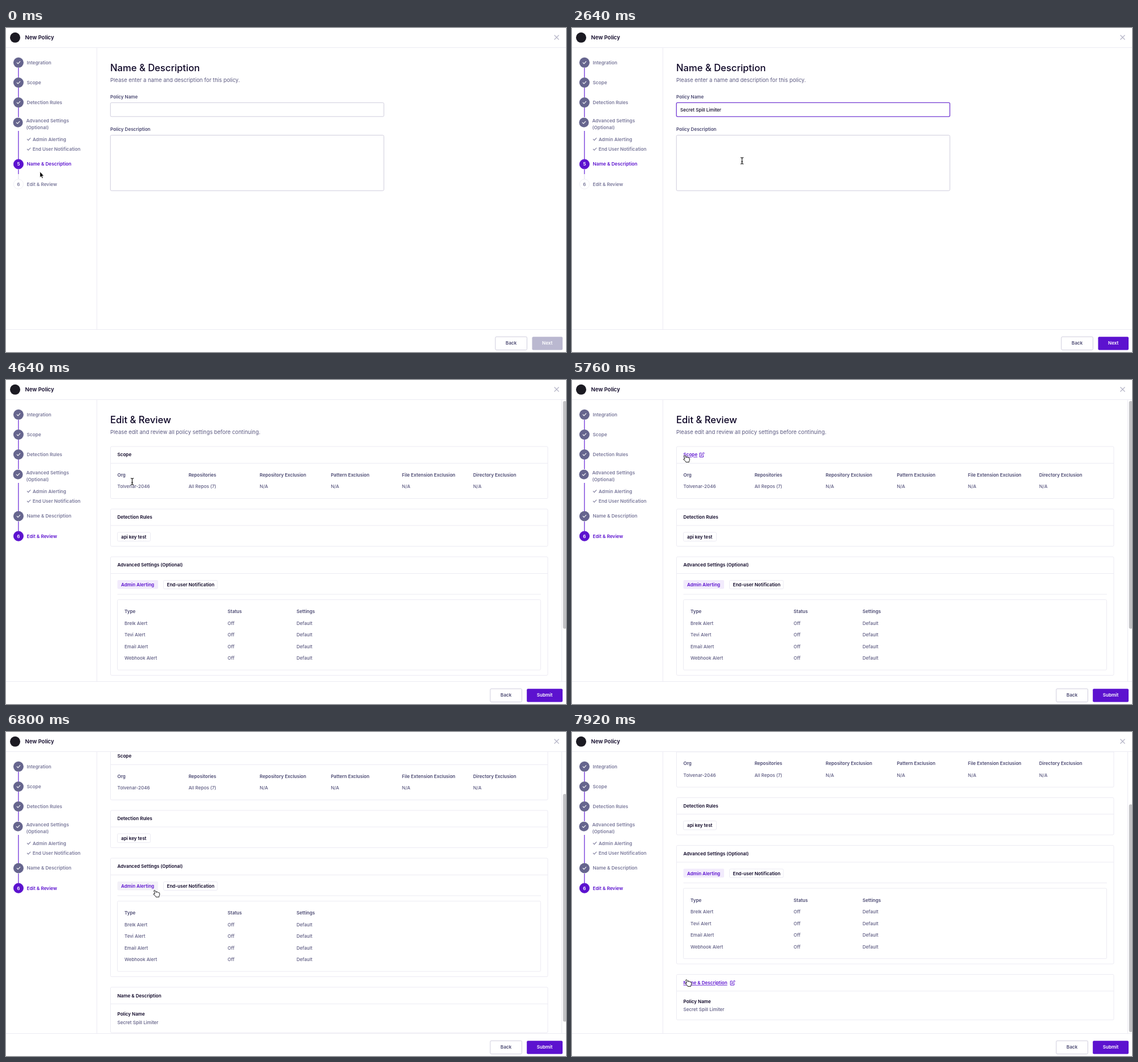
An HTML page for the animation above (8 s loop, 983x570 px).

```html
<!DOCTYPE html>
<html lang="en">
<head>
<meta charset="utf-8">
<title>New Policy</title>
<style>
  html, body { margin: 0; width: 100%; height: 100%; overflow: hidden; background: #fff; }
  svg { display: block; width: 983px; height: 570px; }
  text { font-family: Inter, "Open Sans", sans-serif; white-space: pre; }
  .hover text { fill: #5c12cf; text-decoration: underline; }
  .title .edit { display: none; }
  .hover .edit { display: inline; }
</style>
</head>
<body>
<svg id="stage" viewBox="0 0 983 570" xmlns="http://www.w3.org/2000/svg"></svg>
<script>
const PURPLE = '#5c12cf', INK = '#0d0526', LABEL = '#4b4972', BODY = '#5d5b82',
      MUTED = '#7a799b', DOT = '#66658e', LINE = '#ecebf3', EDGE = '#cfcddd';
const LOOP = 8000;
const POLICY = 'Secret Spill Limiter';

// ---- drawing helpers (text is placed by its vertical centre) ----
const text = (x, cy, str, fill = BODY, size = 8.07, weight = 500, anchor = 'start') =>
  `<text x="${x}" y="${cy + size * 0.36}" fill="${fill}" font-size="${size}" font-weight="${weight}" text-anchor="${anchor}">${str.replace(/&/g, '&amp;')}</text>`;
const bold = (x, cy, str, fill = LABEL) => text(x, cy, str, fill, 8.07, 600);
const step = (x, cy, str, fill = MUTED) => text(x, cy, str, fill, 8.2, 600);
const box = (x, y, w, h, fill = '#fff', stroke = LINE, extra = '') =>
  `<rect x="${x}" y="${y}" width="${w}" height="${h}" rx="2" fill="${fill}" stroke="${stroke}" ${extra}/>`;
const path = (d, stroke, width = 1, fill = 'none', extra = '') =>
  `<path d="${d}" fill="${fill}" stroke="${stroke}" stroke-width="${width}" ${extra}/>`;
const tick = (x, y, color) =>
  path(`M${x - 2.7} ${y + .1}l1.9 1.9 3.6-3.9`, color, 1.1, 'none', 'stroke-linecap="round" stroke-linejoin="round"');

function doneDot(x, y, r = 9) {
  return `<circle cx="${x}" cy="${y}" r="${r}" fill="${DOT}"/>` + tick(x, y, '#fff');
}

function numberDot(y, n, active) {
  const fill = active ? PURPLE : '#fff';
  return `<circle cx="21.9" cy="${y}" r="8.6" fill="${fill}" stroke="${active ? PURPLE : LINE}" stroke-width=".8"/>` +
    text(21.9, y, String(n), active ? '#fff' : MUTED, 8.2, 600, 'middle');
}

function sidebar(last) {
  const tail = last ? 266 : 257;
  let s = path(`M21.8 70V87M21.8 105V122M21.8 140V157M21.8 181V231M21.8 249V${tail}`, '#7c43dc', 1.4);
  if (!last) s += path('M21.8 257V266', '#e4e2ee', 1.2);
  [['Integration', 60.8], ['Scope', 96], ['Detection Rules', 131]].forEach(([label, y]) => {
    s += doneDot(21.9, y) + step(36.5, y, label);
  });
  s += doneDot(21, 166.2, 8.5) + step(35.5, 163.3, 'Advanced Settings') + step(35.5, 175, '(Optional)');
  [['Admin Alerting', 195.6], ['End User Notification', 213]].forEach(([label, y]) => {
    s += tick(40, y, MUTED) + step(46.7, y, label);
  });
  s += last ? doneDot(21.9, 239.5) : numberDot(239.5, 5, true);
  s += step(36.5, 239.5, 'Name & Description', last ? MUTED : PURPLE);
  return s + numberDot(274.6, 6, last) + step(36.5, 274.6, 'Edit & Review', last ? PURPLE : MUTED);
}

const heading = (title, sub) =>
  text(183, 69.6, title, INK, 16.6, 500) + text(183, 91.6, sub, BODY, 9.44, 400);

const button = (x, w, label, fill, stroke, color, id = '') =>
  box(x, 543.2, w, 23.2, fill, stroke, id) + text(x + w / 2, 554.5, label, color, 8.1, 600, 'middle');

// ---- first page: form ----
function formPage() {
  return sidebar(false) + heading('Name & Description', 'Please enter a name and description for this policy.') +
    bold(183, 121, 'Policy Name') + bold(183, 178, 'Policy Description') +
    box(183.3, 131.4, 480, 24.4, '#fff', EDGE, 'id="nameBox"') +
    box(183.3, 188.6, 480, 97.6, '#fff', EDGE, 'id="descBox"') +
    `<g id="value">${text(190, 143.8, POLICY, INK)}</g>` +
    `<rect id="caret" x="189.6" width="1" height="11" fill="${INK}"/>` +
    button(859, 55.5, 'Back', '#fff', EDGE, LABEL) +
    button(923.5, 53.5, 'Next', '#bab8d0', 'none', '#fff', 'id="next"');
}

// ---- second page: review ----
const TITLES = [
  { label: 'Scope', y: 131.5, end: 220 },
  { label: 'Detection Rules', y: 241.3, end: 258 },
  { label: 'Advanced Settings (Optional)', y: 325.5, end: 310 },
  { label: 'Name & Description', y: 552.7, end: 274 }
];
const TABS = [[195.5, 267], [276, 371.5]];

const card = (y, h, sep) => box(183.5, y, 767.5, h) + path(`M184 ${sep}H951`, LINE);

function titleRow({ label, y, end }) {
  const x = end + 3.5;
  const icon = path(`M${x + 4} ${y - 3}H${x + .6}V${y + 4}H${x + 7}V${y + .8}` +
    `M${x + 3} ${y + 1.6}l.3-1.8 4-4 1.4 1.4-4 4z`, PURPLE, 1, 'none', 'class="edit" stroke-linejoin="round"');
  return `<g class="title">${bold(195.5, y, label, INK)}${icon}</g>`;
}

function reviewContent() {
  let s = heading('Edit & Review', 'Please edit and review all policy settings before continuing.');
  s += card(117, 91.5, 146.5) + card(227, 65.5, 256) + card(311, 208.5, 340.5) + card(538, 80, 567.3);
  s += TITLES.map(titleRow).join('');
  const scope = [['Org', 'Tolvenar-2046'], ['Repositories', 'All Repos (7)'], ['Repository Exclusion'],
    ['Pattern Exclusion'], ['File Extension Exclusion'], ['Directory Exclusion']];
  scope.forEach(([head, value = 'N/A'], i) => {
    const x = 195.5 + i * 124.9;
    s += bold(x, 167, head) + text(x, 187.5, value);
  });
  s += box(195.5, 268, 58, 15.5) + bold(202, 276, 'api key test', INK);
  s += '<rect id="tab" x="195.5" y="352" width="71.5" height="15.5" rx="2"/>' + bold(202, 360.2, 'Admin Alerting', PURPLE);
  s += box(276.5, 352.5, 94.5, 15) + bold(282.5, 360.2, 'End-user Notification', INK);
  s += path('M195.5 377H939', LINE) + box(195.5, 386.5, 743, 123.7);
  const cols = [208, 389, 510];
  ['Type', 'Status', 'Settings'].forEach((head, i) => { s += bold(cols[i], 407.3, head); });
  ['Brelk', 'Tevi', 'Email', 'Webhook'].forEach((kind, row) => {
    [kind + ' Alert', 'Off', 'Default'].forEach((cell, i) => { s += text(cols[i], 427.9 + row * 20.5, cell); });
  });
  return s + bold(195.5, 585.3, 'Policy Name', INK) + text(195.5, 600, POLICY);
}

function reviewPage() {
  return sidebar(true) +
    `<g clip-path="url(#view)"><g id="scroller">${reviewContent()}</g></g>` +
    path('M975.5 35V530', LINE) +
    '<rect id="thumb" x="977.8" width="6" height="400.5" rx="2.8" fill="#c1c1c4"/>' +
    button(850, 55.5, 'Back', '#fff', EDGE, LABEL) +
    button(914.2, 62.8, 'Submit', PURPLE, 'none', '#fff');
}

const frame =
  '<circle cx="16" cy="16.8" r="9" fill="#1b1a22"/>' +
  text(33.5, 16.6, 'New Policy', INK, 9.5, 600) +
  path('M962.5 12.5l8 8m0-8l-8 8', '#b4b3c6', 1.2) +
  path('M0 34.5H983M0 530.5H983M159.5 35V530', LINE);

const cursors =
  '<circle id="glow" r="30" fill="#fffbe0" style="mix-blend-mode:multiply"/><g id="pointer">' +
  path('M-.4-.3V10L1.8 7.9 3.4 11.4 5 10.7 3.5 7.3H6.5Z', '#fff', .7, '#000') +
  path('M-2.6-5.6Q0-5.6 0-4Q0-5.6 2.6-5.6M0-4.5V4.5M-2.6 5.8Q0 5.8 0 4Q0 5.8 2.6 5.8M-1.4 1.8H1.4', '#222', 1.2) +
  path('M-.9.8Q.6-.6 1.6 1L3 4.2Q4-.2 5 3.8Q6.4 2.8 7 4.4Q9 3.6 9.2 6Q9.6 9 8.2 10.2V12H2.6L2 10.4-1.8 7.2Q-2.2 5.6.8 6.6Z', '#222', 1, '#fff', 'stroke-linejoin="round"') +
  '</g>';

const stage = document.getElementById('stage');
stage.innerHTML =
  '<defs><clipPath id="view"><rect x="160" y="35" width="815" height="495"/></clipPath></defs>' +
  '<rect width="983" height="570" fill="#fff"/>' + frame +
  `<g id="form">${formPage()}</g><g id="review">${reviewPage()}</g>` + cursors;

const el = {};
stage.querySelectorAll('[id]').forEach(node => { el[node.id] = node; });
const titles = [...stage.querySelectorAll('.title')];
const shapes = [...el.pointer.children];

// ---- timeline: [time, ...values] ----
const MOVES = [
  [20, 60, 253], [760, 320, 165], [1180, 212, 143.5], [2180, 212, 143.5], [2680, 300, 235],
  [3080, 300, 235], [3280, 337, 264], [3400, 337, 264], [3600, 921, 510.5], [3780, 947, 552],
  [4240, 947, 552], [4640, 221.5, 178.5], [5100, 205, 133], [5760, 197.3, 132.5], [6080, 225, 238],
  [6200, 225, 238], [6480, 260, 321], [6800, 260.5, 278.3], [7040, 262, 290], [7600, 203, 436], [7900, 200.5, 435.5]
];
const SCROLL = [[6440, 0], [6800, 89], [7040, 111.5]];
const CLICKS = [[1230, 1590], [2720, 3030], [3860, 4230]];
const NAME_FOCUS = 1230, PASTE = 2000, DESC_FOCUS = 2720, REVIEW = 4020, BLINK = 530;

function sample(keys, t) {
  if (t <= keys[0][0]) return keys[0].slice(1);
  const i = keys.findIndex(k => k[0] > t);
  if (i < 0) return keys[keys.length - 1].slice(1);
  const [a, b] = [keys[i - 1], keys[i]];
  const p = (t - a[0]) / (b[0] - a[0]), e = p * p * (3 - 2 * p);
  return a.slice(1).map((v, n) => v + (b[n + 1] - v) * e);
}

const show = (node, on) => node.setAttribute('display', on ? 'inline' : 'none');
const clamp = v => Math.max(0, Math.min(1, v));
const inside = (v, lo, hi) => v >= lo && v <= hi;

function focus(node, on) {
  node.setAttribute('stroke', on ? '#733bd3' : EDGE);
  node.setAttribute('stroke-width', on ? 1.3 : 1);
}

function drawForm(t) {
  const inDesc = t >= DESC_FOCUS;
  focus(el.nameBox, t >= NAME_FOCUS && !inDesc);
  focus(el.descBox, inDesc);
  show(el.value, t >= PASTE);
  const since = inDesc ? DESC_FOCUS : t >= PASTE ? PASTE : NAME_FOCUS;
  show(el.caret, t >= since && Math.floor((t - since) / BLINK) % 2 === 0);
  el.caret.setAttribute('x', !inDesc && t >= PASTE ? 190.5 + el.value.getBBox().width : 189.6);
  el.caret.setAttribute('y', inDesc ? 196 : 138.5);
  const p = clamp((t - PASTE + 40) / 120);
  const mix = (a, b) => Math.round(a + (b - a) * p);
  el.next.setAttribute('fill', `rgb(${mix(186, 92)},${mix(184, 18)},${mix(208, 207)})`);
}

const overTitle = (row, x, cy) => inside(x, 194, row.end + 12) && inside(cy, row.y - 8, row.y + 7);
const overTab = ([a, b], x, cy) => inside(x, a, b) && inside(cy, 351, 368);

// 0 arrow, 1 text beam, 2 hand
function pointerKind(t, x, y, cy) {
  if (inside(y, 543, 567) && inside(x, 914, 977)) return 2;
  if (t < REVIEW) {
    return inside(x, 183, 663) && (inside(y, 131, 156) || inside(y, 188, 286)) ? 1 : 0;
  }
  if (TITLES.some(row => overTitle(row, x, cy)) || TABS.some(tab => overTab(tab, x, cy))) return 2;
  return inside(x, 195, 255) && inside(cy, 160, 194) ? 1 : 0;
}

function draw(t) {
  const [x, y] = sample(MOVES, t), [scroll] = sample(SCROLL, t), cy = y + scroll;
  const review = t >= REVIEW;
  show(el.form, !review);
  show(el.review, review);
  if (review) {
    el.scroller.setAttribute('transform', `translate(0 ${-scroll})`);
    el.thumb.setAttribute('y', 37 + scroll * 0.81);
    titles.forEach((node, i) => node.classList.toggle('hover', overTitle(TITLES[i], x, cy)));
    el.tab.setAttribute('fill', overTab(TABS[0], x, cy) ? '#f3f1f8' : '#f2ebfc');
  } else {
    drawForm(t);
  }
  const click = CLICKS.find(([a, b]) => inside(t, a, b));
  show(el.glow, !!click);
  if (click) {
    el.glow.setAttribute('opacity', Math.min(clamp((t - click[0]) / 80), clamp((click[1] - t) / 60)));
    el.glow.setAttribute('cx', x + .8);
    el.glow.setAttribute('cy', y + .5);
  }
  const kind = pointerKind(t, x, y, cy);
  shapes.forEach((node, i) => show(node, i === kind));
  el.pointer.setAttribute('transform', `translate(${x} ${y})`);
}

function tickFrame() {
  draw(performance.now() % LOOP);
  requestAnimationFrame(tickFrame);
}
tickFrame();
</script>
</body>
</html>
```
